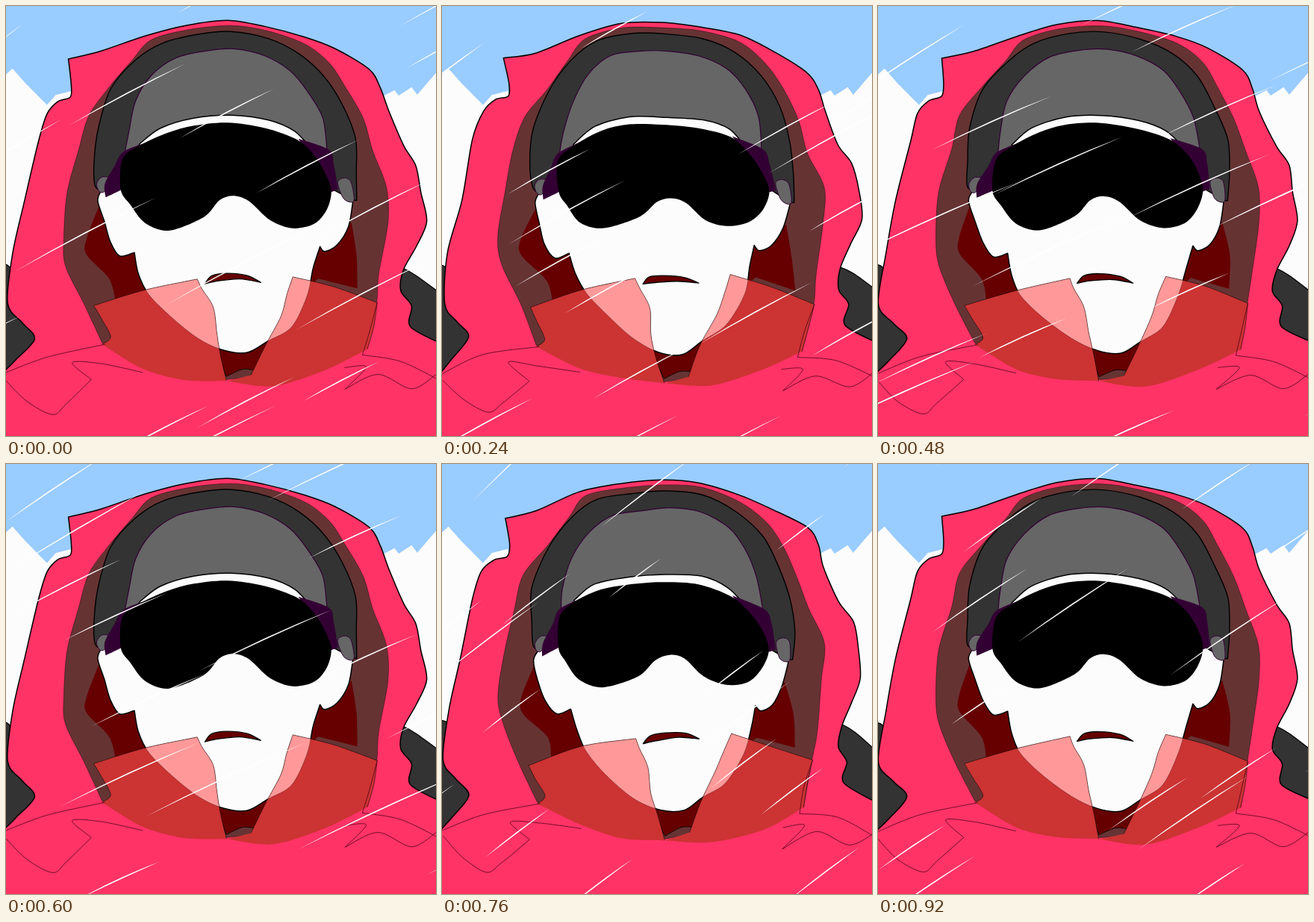
Recreate the animation shown at these times as an HTML page with a canvas. Size 576 by 576 pixels, loop 0.96 s.

```html
<!DOCTYPE html>
<html lang="en">
<head>
<meta charset="utf-8">
<title>Blizzard</title>
<style>
html, body { margin: 0; width: 100%; height: 100%; overflow: hidden; background: #9cf; }
canvas { display: block; width: 576px; height: 576px; }
</style>
</head>
<body>
<canvas id="stage" width="576" height="576"></canvas>
<script>
const ctx = document.getElementById('stage').getContext('2d');
const SIZE = 576, FRAME = 40, FRAMES = 24, POSES = 4, SPAN = 700, STREAKS = 19;

function seeded(seed) {
  return () => {
    seed = (seed * 16807) % 2147483647;
    return seed / 2147483647;
  };
}

// Smooth curve through "x,y" points; "!" marks a sharp corner.
function spline(points, closed) {
  const pts = points.flatMap(p => p.sharp ? [p, p] : [p]);
  const n = pts.length;
  const at = i => closed ? pts[(i + n) % n] : pts[Math.max(0, Math.min(n - 1, i))];
  const path = new Path2D();
  path.moveTo(pts[0].x, pts[0].y);
  for (let i = 0; i < (closed ? n : n - 1); i++) {
    const a = at(i - 1), b = at(i), c = at(i + 1), d = at(i + 2);
    if (b === c) continue;
    path.bezierCurveTo(
      b.x + (c.x - a.x) / 6.5, b.y + (c.y - a.y) / 6.5,
      c.x - (d.x - b.x) / 6.5, c.y - (d.y - b.y) / 6.5, c.x, c.y);
  }
  if (closed) path.closePath();
  return path;
}

// Each redrawing shifts the same key points by a gentle hand wobble.
function wobble(text, pose) {
  return text.trim().split(/\s+/).map(word => {
    const [x, y] = word.replace('!', '').split(',').map(Number);
    return {
      x: x + 1.8 * Math.sin(y / 21 + pose * 1.7),
      y: y + 1.8 * Math.sin(x / 27 + pose * 2.3),
      sharp: word.endsWith('!')
    };
  });
}

function drawing(pose) {
  const shape = text => spline(wobble(text, pose), true);
  const line = text => spline(wobble(text, pose), false);
  const collar = (edge, hem) => ({ fill: shape(`${edge} ${hem}`), edge: line(edge) });
  return {
    packs: [
      shape('-9,345! 6,349 20,380 45,440! 20,480 -9,500!'),
      shape('515,345! 534,350 552,360 585,386! 585,470! 540,465 520,430!')
    ],
    jacket: shape(`-9,585! -9,498! 14,473 37,444 20,423 2,398 9,330 25,260 42,180 54,143 70,127 87,122
      89,105 84,71! 127,62 185,39 240,25 295,21 345,27 398,40 440,58 488,86 503,110 512,140
      532,186 550,212 557,248 562,287 549,320 534,352 530,380 543,400 540,428 585,453! 585,585!`),
    lining: shape(`128,453! 104,400 81,348 76,310 83,250 97,193 110,148 140,110 170,72 193,44 242,31
      300,28 350,33 400,50 434,77 456,110 477,152 491,195 511,242 510,290 501,360 496,400 484,460!
      430,478 328,498! 298,502! 200,482`),
    hair: [
      shape('124,270! 107,312 108,334 140,367 147,400! 220,410! 180,330!'),
      shape('461,292! 470,335 472,380! 420,365! 400,380! 415,320!')
    ],
    hat: shape(`134,252! 121,243 119,210 122,165 142,112 174,72 208,48 255,38 300,36 350,43 393,63
      428,95 451,135 467,180 471,225 470,262! 456,262!`),
    cap: shape(`159,198! 163,168 174,127 196,92 228,68 268,61 305,59 346,66 382,85 405,113 423,150
      430,196!`),
    neck: shape('276,450! 368,435! 334,488! 318,488 297,498!'),
    face: shape(`465,262! 457,297 443,321 427,329 420,322! 413,350 404,387 381,428 350,448 324,465
      292,463 257,446 220,415 192,385 179,358 172,330! 153,336 139,318 130,290 123,263 128,250!
      155,240! 178,184! 205,162 250,150 300,148 350,152 385,166 408,190! 438,246!`),
    goggles: shape(`157,205 182,184 215,168 250,160 295,158 345,163 388,177 412,198 428,222 437,248
      429,273 411,291 382,296 352,286 325,262 305,256 286,262 264,283 217,299 185,290 166,266
      155,247`),
    straps: [
      shape('188,181! 157,196 147,215 134,240 134,258! 156,247! 170,210'),
      shape('390,176! 432,193 440,212 446,247! 437,250! 425,225')
    ],
    pads: [
      shape('123,240 130,231 142,231! 133,250 126,250'),
      shape('446,238 455,232 464,238 466,263 453,260')
    ],
    mouth: shape('268,373! 277,363 297,360 325,362 343,370! 315,367 285,370'),
    collars: [
      collar('128,455! 139,445 127,422 117,403! 185,380 258,366! 264,380 277,405 281,440 288,470 297,504!',
        '240,500 185,485'),
      collar('330,495! 347,454 367,414 377,385 386,361! 440,377 497,398! 491,430 484,461!',
        '430,488 360,508 298,504!')
    ],
    seams: [
      line('-5,494 55,469 132,455'),
      line('0,500 28,528 61,546 80,533 116,502! 90,478 130,481 185,490'),
      line('497,398 486,435 478,469! 530,475 585,502'),
      line('455,486 484,485 455,515! 500,494 545,511 580,491')
    ]
  };
}

const mountains = [
  '-5,98! 10,83! 30,104! 55,131! 68,118! 90,114! 110,300! -5,400!',
  '490,130! 522,112! 527,119! 545,107! 552,117! 563,105! 580,86! 580,400! 490,400!'
].map(text => spline(wobble(text, 0), true));
const drawings = Array.from({ length: POSES }, (_, pose) => drawing(pose));

const random = seeded(4217);
const flakes = Array.from({ length: STREAKS }, (_, i) => ({
  x: random() * SPAN,
  y: (i + random()) / STREAKS * SPAN,
  length: .5 + random()
}));

function paint(shapes, fill, stroke, width = 1) {
  for (const path of [].concat(shapes)) {
    if (fill) { ctx.fillStyle = fill; ctx.fill(path); }
    if (stroke) { ctx.strokeStyle = stroke; ctx.lineWidth = width; ctx.stroke(path); }
  }
}

function clipped(area, paintInside) {
  ctx.save();
  ctx.clip(area);
  paintInside();
  ctx.restore();
}

function drawFigure(d) {
  paint(d.packs, '#333', '#000', 1.2);
  paint(d.jacket, '#f36', '#000', 1.5);
  paint(d.lining, '#633', 'rgba(0,0,0,.5)', .8);
  paint(d.hair, '#600');
  paint(d.hat, '#333', '#000', 1.4);
  paint(d.cap, '#666', '#303', 1.2);
  paint(d.neck, '#600', '#000', .8);
  paint(d.face, '#fcfcfc', '#000', 1.5);
  paint(d.pads, '#666', '#303');
  paint(d.straps, '#303');
  paint(d.goggles, '#000');
  paint(d.mouth, '#600', '#000', 1.3);
  for (const { fill, edge } of d.collars) {
    paint(fill, '#c33');
    clipped(d.face, () => paint(fill, '#f99'));
    clipped(fill, () => paint(d.face, null, 'rgba(90,30,30,.6)', .8));
    paint(edge, null, 'rgba(0,0,0,.6)', .9);
  }
  paint(d.seams, null, 'rgba(70,0,20,.75)');
}

// The wind swings between steep and flat; flat gusts stretch the streaks.
function drawSnow(frame) {
  const turn = 2 * Math.PI / FRAMES;
  const wind = .57 + .1 * Math.cos(turn * (frame - 21)) + .12 * Math.cos(2 * turn * (frame - 8.2));
  const reach = 75 / wind;
  const drift = frame / FRAMES * SPAN;
  ctx.fillStyle = '#fff';
  for (const flake of flakes) {
    const x = (flake.x - 3 * drift + 3 * SPAN) % SPAN - 100;
    const y = (flake.y + 2 * drift) % SPAN;
    const slope = wind + .3 * Math.max(0, 1 - (x + y) / 250);
    const run = reach * flake.length;
    const midX = x + run / 2, midY = y - run * (slope / 2 + .025);
    ctx.beginPath();
    ctx.moveTo(x, y);
    ctx.quadraticCurveTo(midX - .8, midY - 1.5, x + run, y - run * slope);
    ctx.quadraticCurveTo(midX + .8, midY + 1.5, x, y);
    ctx.fill();
  }
}

function draw(time) {
  const frame = Math.max(1, Math.floor(time / FRAME) % FRAMES);
  const pose = Math.floor((frame + 11) / 3) % POSES;
  ctx.fillStyle = '#9cf';
  ctx.fillRect(0, 0, SIZE, SIZE);
  paint(mountains, '#fcfcfc');
  drawFigure(drawings[pose]);
  drawSnow(frame);
}

const start = performance.now();
function tick() {
  draw(performance.now() - start);
  requestAnimationFrame(tick);
}
ctx.lineJoin = 'round';
tick();
</script>
</body>
</html>
```
